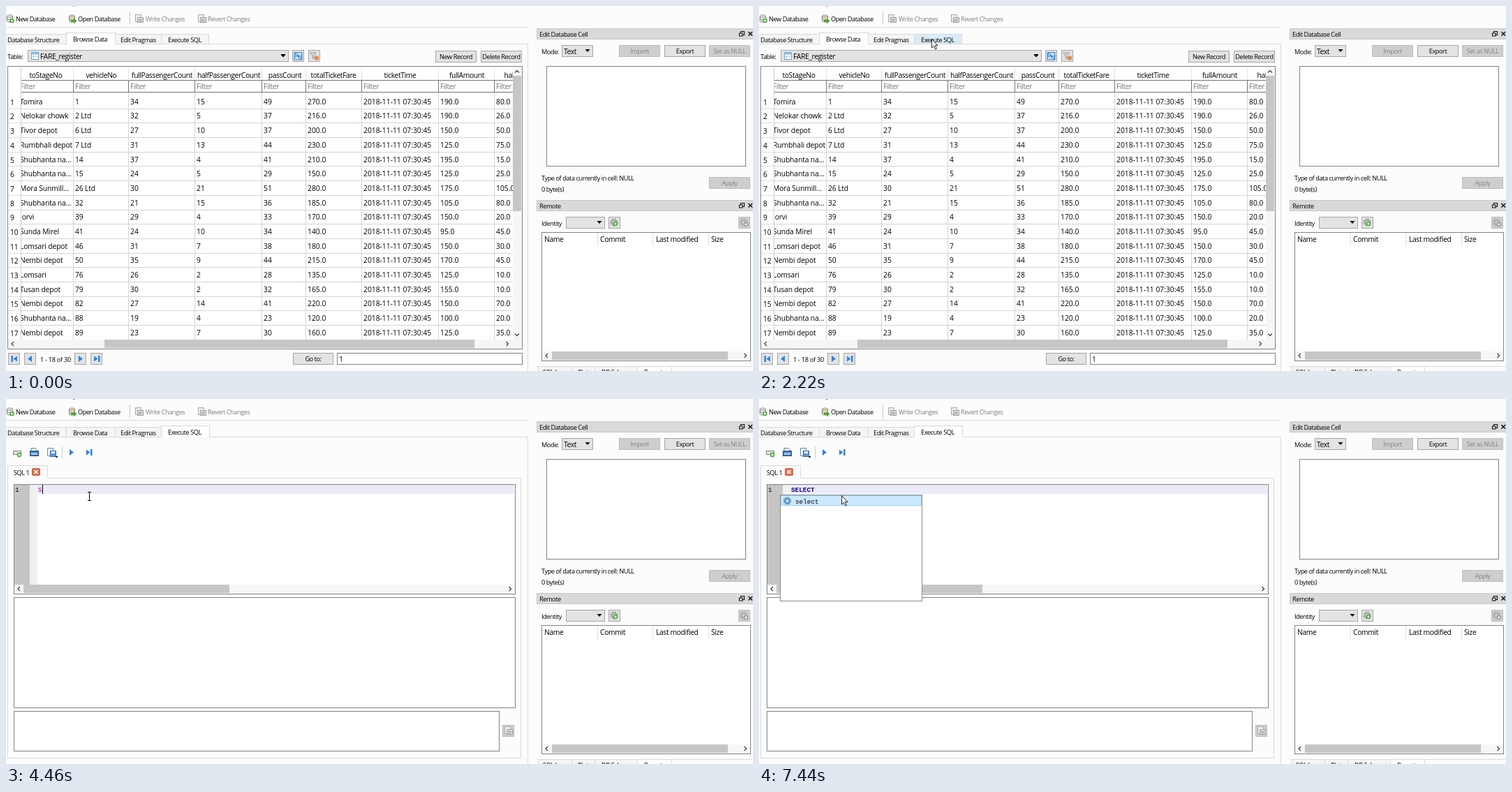
These frames come from a looping animation (1070 by 523 pixels, 8000 ms). An HTML page:

```html
<!DOCTYPE html>
<html lang="en">
<head>
<meta charset="utf-8">
<title>Database tool</title>
<style>
html, body { margin: 0; width: 100%; height: 100%; overflow: hidden; background: #fcfcfc; }
svg { display: block; }
text { font-family: "Open Sans", "Noto Sans", sans-serif; font-size: 10.3px; white-space: pre; }
.ui { font-size: 9.2px; letter-spacing: -.44px; }
.head { letter-spacing: -.36px; }
.name { letter-spacing: -.12px; }
.code { font-family: "Liberation Mono", monospace; font-size: 9.33px; }
.mid { text-anchor: middle; }
</style>
</head>
<body>
<svg id="stage" width="1070" height="523" viewBox="0 0 1070 523"></svg>
<script>
const LOOP = 8000;
const EDGE = '#7f8389', SOFT = '#d9d9d9', BLUE = '#2f83dc', HOVER = '#d9ebf9';

// Basic shapes
const fill = (x, y, w, h, c, extra = '') => `<rect x="${x}" y="${y}" width="${w}" height="${h}" fill="${c}" ${extra}/>`;
const box = (x, y, w, h, c, line, extra = '') =>
  `<rect x="${x + .5}" y="${y + .5}" width="${w - 1}" height="${h - 1}" fill="${c}" stroke="${line}" ${extra}/>`;
const path = (d, c = 'none', line = 'none', w = 1) => `<path d="${d}" fill="${c}" stroke="${line}" stroke-width="${w}"/>`;
const at = (x, y, s) => `<g transform="translate(${x} ${y})">${s}</g>`;
const text = (x, mid, s, cls = 'ui', c = '#000') => `<text x="${x}" y="${mid + 3.5}" class="${cls}" fill="${c}">${s}</text>`;
const group = (id, s, extra = '') => `<g id="${id}" ${extra}>${s}</g>`;

// Controls
const button = (x, y, w, label = '', off = false) =>
  box(x, y, w, 17, off ? '#cecece' : '#e3e3e3', off ? '#bdbdbd' : '#a6a6a6') +
  text(x + w / 2, y + 8, label, 'ui mid', off ? '#838383' : '#000');
const drop = (x, y) => path(`M${x - 3.5} ${y - 2}h7l-3.5 4z`, '#000');
const combo = (x, y, w) => box(x, y, w, 17, '#e3e3e3', '#a6a6a6') + drop(x + w - 8, y + 8);
const chevron = (x, y, turn) =>
  `<path d="M-1.5 -3L1.5 0L-1.5 3" fill="none" stroke="#444" stroke-width="1.3" transform="translate(${x} ${y}) rotate(${turn})"/>`;
const hbar = (x, y, w, from, to) => fill(x, y, w, 13, '#f6f6f6') + fill(from, y, to - from, 12, '#c6c6c6') +
  chevron(x + 6.5, y + 6, 180) + chevron(x + w - 7, y + 6, 0);

// Icons
const plus = (x, y, c = '#4ba63c') =>
  `<circle cx="${x}" cy="${y}" r="3.3" fill="${c}"/>` + path(`M${x - 2} ${y}h4M${x} ${y - 2}v4`, 'none', '#fff', 1.1);
const cylinder = (c, line) => path('M.5 2.5v7c0 2 8 2 8 0v-7c0-2-8-2-8 0c0 2 8 2 8 0M.5 6c0 2 8 2 8 0', c, line, .9);
const sheets = at(0, 0, box(0, 0, 9, 11, '#eee', '#aaa') + box(3, 4, 9, 8, '#dcdcdc', '#a0a0a0') + path('M5 7.5h5M5 9.5h4', 'none', '#999'));
const gear = (x, y, c) => `<circle cx="${x}" cy="${y}" r="4.6" fill="none" stroke="${c}" stroke-width="2.4" stroke-dasharray="2.2 1.4"/>` +
  `<circle cx="${x}" cy="${y}" r="3.2" fill="none" stroke="${c}" stroke-width="2.2"/>`;
const play = 'M0 -4.5l6 4.5l-6 4.5z';
const skip = path('M0 -4l5.5 4l-5.5 4z', BLUE) + fill(6, -4.5, 2.5, 9, BLUE);
const flip = s => `<g transform="scale(-1 1)">${s}</g>`;

function tabs(active) {
  const names = ['Database Structure', 'Browse Data', 'Edit Pragmas', 'Execute SQL'];
  const edges = [-4, 86, 156, 222, 290], starts = [2, 96, 164, 232];
  let s = path('M0 54.5H748', 'none', SOFT);
  names.forEach((name, i) => {
    const x = edges[i], w = edges[i + 1] - x, on = i === active;
    s += on ? box(x, 38, w + 2, 17, '#fff', SOFT) + fill(x + 1, 54, w, 2, '#fdfdfd')
            : box(x, 40, w + 1, 15, '#f5f5f5', SOFT);
    if (!on && i > 1) s += fill(x + 1, 41, w - 1, 13, HOVER, `id="tab${i}" display="none"`);
  });
  names.forEach((name, i) => s += text(starts[i], i === active ? 47 : 48, name));
  return s;
}

function toolbar() {
  return path('M0 30.5H748M747.5 54V523', 'none', SOFT) + path('M177.5 8V27', 'none', '#c8c8c8') +
    at(1, 12, cylinder('#f3f3f3', '#777') + plus(7.5, 9)) + text(14, 18, 'New Database') +
    at(90, 12, cylinder('#f3e9b8', '#777') + path('M3 8h4v-2.500l4.500 4l-4.500 4v-2.500h-4z', '#4ba63c')) +
    text(103, 18, 'Open Database') +
    at(185, 12, sheets) + text(200, 18, 'Write Changes', 'ui', '#808080') +
    at(275, 12, sheets) + text(289, 18, 'Revert Changes', 'ui', '#808080');
}

function browse() {
  const cols = [22, 97, 176, 271, 367, 430, 510, 620, 700, 776];
  const heads = ['toStageNo', 'vehicleNo', 'fullPassengerCount', 'halfPassengerCount', 'passCount',
    'totalTicketFare', 'ticketTime', 'fullAmount', 'halfAmount'];
  // stage | vehicle | full count | half count | fare | full amount | half amount
  const rows = `Tomira|1|34|15|270|190|80
Nelokar chowk|2 Ltd|32|5|216|190|26
Tivor depot|6 Ltd|27|10|200|150|50
Rumbhali depot|7 Ltd|31|13|230|125|75
Shubhanta na...|14|37|4|210|195|15
Shubhanta na...|15|24|5|150|125|25
Mora Sunmill...|26 Ltd|30|21|280|175|105
Shubhanta na...|32|21|15|185|105|80
Jorvi|39|29|4|170|150|20
Sunda Mirel|41|24|10|140|95|45
Lomsari depot|46|31|7|180|150|30
Nembi depot|50|35|9|215|170|45
Lomsari|76|26|2|135|125|10
Tusan depot|79|30|2|165|155|10
Nembi depot|82|27|14|220|150|70
Shubhanta na...|88|19|4|120|100|20
Nembi depot|89|23|7|160|125|35`.split('\n').map(r => r.split('|'));
  const left = i => i ? cols[i] + 2 : 20;
  const pitch = 20.69;

  let grid = fill(177, 88, 93, 19, HOVER, 'id="column" display="none"');
  heads.forEach((name, i) => {
    const x = cols[i], w = cols[i + 1] - x;
    const mid = [57, 136.5, 223.5, 319, 399.5, 469, 564.5, 660, 740][i];
    grid += path(`M${x + w - .5} 88V107`, 'none', '#e2e2e2') + path(`M${x + w - .5} 124V478`, 'none', '#d4d4d4') +
      box(x - 1, 106, w + 1, 18, '#fff', '#737373') +
      text(mid, 99, name, 'head mid') + text(left(i), 115, 'Filter', 'head', '#777');
  });
  let numbers = '';
  rows.forEach(([stage, vehicle, full, half, fare, fullSum, halfSum], k) => {
    const y = 137.3 + k * pitch, line = Math.round(127 + (k + 1) * pitch) - .5;
    const cells = [stage, vehicle, full, half, +full + +half, fare + '.0', '2018-11-11 07:30:45', fullSum + '.0', halfSum + '.0'];
    cells.forEach((c, i) => grid += text(left(i), y, c, i < 2 ? 'name' : ''));
    grid += path(`M22 ${line}H726`, 'none', '#d4d4d4');
    numbers += text(6, y + 1, k + 1, 'name') + path(`M3 ${line}H22`, 'none', '#dedede');
  });

  return tabs(1) + text(2, 72, 'Table:') + combo(31, 63, 374) +
    fill(31.5, 63.5, 373, 16, '#e5f1fb', 'id="combo" display="none" stroke="#0078d7"') + drop(397, 71.5) +
    box(36, 66, 11, 11, '#fff', '#6ea6d8') + fill(37, 67, 9, 2.500, '#8fc0ea') + path('M39.5 67v9M37 72.5h9', 'none', '#b5d3ec') +
    text(49, 72, 'FARE_register', 'head') +
    button(410, 63, 17) + fill(412.5, 66, 12, 11.5, '#4f95da') +
    path('M415 71a3.600 3.600 0 0 1 6.500-1.500M422 72.500a3.600 3.600 0 0 1-6.500 1.500M422 67v3h-3M415 76.500v-3h3', 'none', '#fff', 1.3) +
    button(433, 63, 17) + path('M435.500 67h9l-3.500 4v5l-2-1.500v-3.500z', '#d8d8d8', '#888', .8) + '<circle cx="445" cy="74.500" r="3.200" fill="#e88750"/>' +
    button(615, 64, 59, 'New Record') + button(680, 64, 59, 'Delete Record') +
    box(2, 86, 738, 406, '#fff', EDGE) +
    `<g clip-path="url(#table)">${grid}</g>` + numbers + path('M21.5 88V478', 'none', '#cfcfcf') +
    fill(726, 87, 13, 391, '#f6f6f6') + fill(726, 100, 12, 194, '#c6c6c6') + chevron(732, 94, -90) + chevron(732, 471, 90) +
    hbar(3, 478, 722, 141, 671) + fill(725, 478, 14, 13, '#f6f6f6') +
    [3, 26, 98, 121].map(x => button(x, 497, 17)).join('') +
    at(16, 505.5, flip(skip)) + at(37, 505.5, flip(path(play, BLUE))) +
    at(104, 505.5, path(play, BLUE)) + at(126, 505.5, skip) +
    `<text x="49" y="509.5" class="ui" style="letter-spacing:-.3px">1 - 18 of 30</text>` +
    button(411, 497, 58, 'Go to:') + box(474, 497, 266, 17, '#fff', EDGE) + text(477, 506, '1', 'name');
}

function editor() {
  return tabs(3) +
    at(10, 72, box(0, 2, 12, 6, '#ddd', '#888') + plus(9, 8)) +
    at(34, 70, path('M2 4V.5h6l2 2V4', '#fff', '#678', 1) + box(0, 4, 13, 8, '#4377b4', '#2c4f7c') + fill(2, 7, 9, 3, '#9fc3ea')) +
    at(59, 70, box(0, 0, 9, 12, '#eef4fb', '#6a90bd') + box(4, 4, 9, 9, '#5b98d8', '#386ca6') + fill(6, 5, 5, 3, '#fff') + path('M11.500 12h4l-2 2.500z', '#000')) +
    path('M80.5 68V86', 'none', '#cfcfcf') + at(91, 76.5, path(play, BLUE)) + at(115, 76.5, skip) +
    path('M59.5 113.5H737.5V514.500H2.500V95.500H59.500V113', 'none', SOFT) + text(11, 105, 'SQL 1') +
    box(37, 99, 12, 11, '#dc7350', '#c25f3d', 'rx="1.5"') + path('M40.500 102l5 5m0-5l-5 5', 'none', '#fff', 1.5) +
    box(11, 122, 719, 158, '#fff', EDGE) + fill(12, 123, 22, 143, '#c5c5c5') + fill(34, 123, 11, 143, '#f0f0f0') +
    fill(45, 123, 683, 13, '#ebebf7') + text(13, 129, '1', 'code') +
    hbar(12, 266, 717, 25, 320) +
    box(11, 284, 719, 159, '#fff', EDGE) + box(11, 447, 696, 58, '#fff', EDGE) +
    button(711, 467, 17, '', true) + at(714, 469, sheets) +
    text(46, 129, '', 'code" id="typed') + fill(46, 123, 1, 13, '#000', 'id="caret"') +
    group('popup', box(30, 137, 204, 153, '#fff', '#8a8a8a') + box(31, 138, 202, 15, '#cce8ff', '#99d1ff') +
      gear(40.5, 146, '#5b93c4') + text(52, 146, 'select', 'code'));
}

function dock() {
  const bar = (y, name) => box(760, y, 314, 16, '#d9d9d9', '#c9c9c9') + text(764, y + 8, name) +
    path(`M1052.5 ${y + 7}v-2.500h5v5h-2.500M1050.500 ${y + 7}h4.500v4h-4.500z`, 'none', '#111', 1.1) +
    path(`M1063.5 ${y + 5}l5.500 5.500m0-5.500l-5.500 5.500`, 'none', '#111', 1.5);
  const bottom = [[762, 810, 769, 'SQL Log'], [810, 843, 819, 'Plot'], [843, 904, 853, 'DB Schema'], [904, 953, 914, 'Remote']];
  return bar(32, 'Edit Database Cell') + text(767, 65, 'Mode:') + combo(796, 56, 45) + text(799, 65, 'Text', 'head') +
    button(878, 56, 59, 'Import', true) + button(943, 56, 59, 'Export') + button(1007, 56, 59, 'Set as NULL', true) +
    box(774, 86, 286, 144, '#fff', EDGE) + text(767, 246, 'Type of data currently in cell: NULL') +
    text(767, 262, '0 byte(s)') + button(1007, 245, 59, 'Apply', true) +
    bar(278, 'Remote') + text(767, 311, 'Identity') + combo(802, 302, 56) +
    button(863, 302, 17) + gear(871, 310, '#a5a5a5') + plus(873, 312) +
    button(1049, 302, 17, '', true) + gear(1056.5, 310, '#b0b0b0') + plus(1060, 313, '#9a9a9a') +
    box(767, 324, 300, 185, '#fff', EDGE) +
    [['Name', 771], ['Commit', 851], ['Last modified', 931], ['Size', 1010]].map(([s, x]) => text(x, 334, s, 'head')).join('') +
    path('M847.5 325V344M926.5 325V344M1006.5 325V344', 'none', '#dedede') + hbar(768, 495, 298, 782, 1034) +
    bottom.map(([a, b, x, s], i) => box(a, 516, b - a + 1, 12, i === 3 ? '#fff' : '#f5f5f5', SOFT) + text(x, 524, s)).join('') +
    path('M760 516.5H905M953 516.5H1070', 'none', SOFT);
}

const stage = document.getElementById('stage');
stage.innerHTML = '<clipPath id="table"><rect x="22" y="87" width="704" height="391"/></clipPath>' +
  fill(0, 0, 1070, 523, '#fcfcfc') + toolbar() + fill(96, 0, 2, 1, '#999', 'id="speck"') + dock() +
  group('browse', browse()) + group('editor', editor()) +
  group('arrow', path('M.5.5v12.500l2.900-2.700l2.200 4.700l1.900-.9l-2.200-4.600h3.700z', '#fff', '#111', .9)) +
  group('ibeam', path('M-2.500-6h5M0-6V6M-2.500 6h5', 'none', '#111', 1.1));

const el = id => document.getElementById(id);
const show = (id, on) => el(id).setAttribute('display', on ? 'inline' : 'none');
const latest = (steps, t) => steps.filter(s => s[0] <= t).pop();

// time, pointer, x, y, hovered part
const moves = [
  [0], [510, 'arrow', 290, 477], [650, 'arrow', 234, 191], [790, 'arrow', 231, 150], [1290, 'arrow', 233, 127],
  [1440, 'arrow', 186, 100, 'column'], [1590, 'arrow', 53, 69], [1730, 'arrow', 112, 66, 'combo'],
  [1850, 'arrow', 172, 56], [1970, 'arrow', 214, 49, 'tab2'], [2095, 'arrow', 240, 47, 'tab3'], [2220, 'arrow', 247, 47, 'tab3'],
  [2470, 'arrow', 247, 47], [2720, 'arrow', 232, 70], [2840, 'arrow', 180, 108], [2960, 'ibeam', 135.5, 146.5],
  [3080, 'ibeam', 122.5, 150.5], [3340, 'ibeam', 120.5, 145.5], [3460, 'ibeam', 119.5, 139.5], [5830, 'arrow', 118, 138]
];
// time, typed letters, caret shown
const typing = [
  [0, 0, 1], [2960, 0, 0], [3460, 0, 1], [3960, 0, 0], [4460, 1, 1], [4960, 2, 1], [5460, 2, 0],
  [5830, 3, 1], [6330, 4, 1], [6700, 5, 1], [7070, 6, 1], [7440, 6, 0]
];

function draw(now) {
  const t = now % LOOP, sql = t >= 2470;
  show('browse', !sql);
  show('editor', sql);
  el('speck').setAttribute('fill', sql ? '#b03040' : '#999');

  const [, pointer, x, y, hover] = latest(moves, t);
  for (const id of ['arrow', 'ibeam']) {
    show(id, id === pointer);
    if (id === pointer) el(id).setAttribute('transform', `translate(${x} ${y})`);
  }
  for (const id of ['column', 'combo', 'tab2', 'tab3']) show(id, id === hover);

  const [, count, caret] = latest(typing, t), typed = el('typed');
  typed.textContent = 'SELECT'.slice(0, count);
  typed.setAttribute('fill', count === 6 ? '#14008b' : '#8b108b');
  typed.setAttribute('font-weight', count === 6 ? 700 : 400);
  el('caret').setAttribute('x', Math.round(46 + count * 5.6));
  show('caret', caret);
  show('popup', t >= 5830);
}

const start = performance.now();
function tick() {
  draw(performance.now() - start);
  requestAnimationFrame(tick);
}
tick();
</script>
</body>
</html>
```
